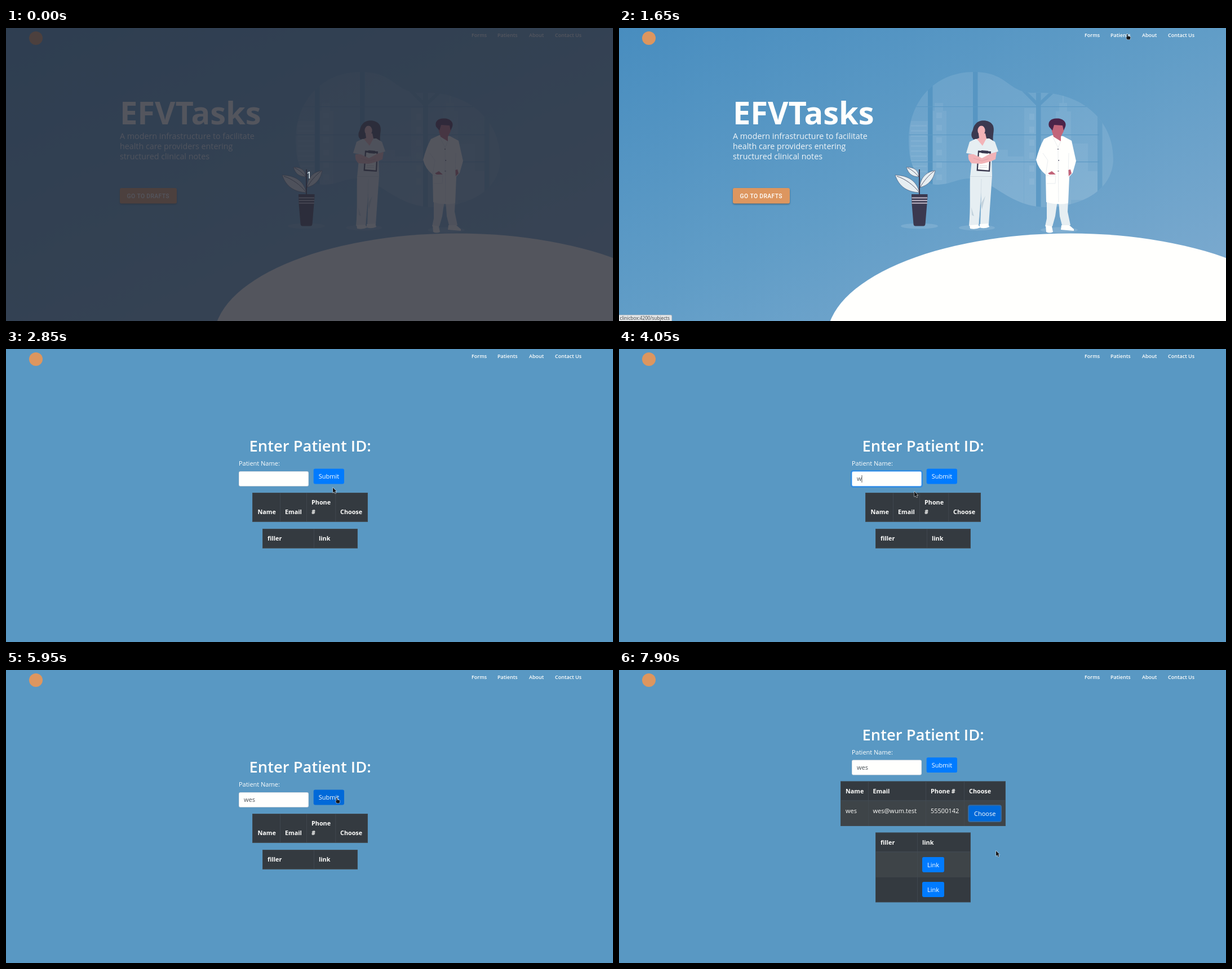
These frames come from a looping animation (1077x520 px, 8 s). An HTML page with a canvas:

```html
<!DOCTYPE html>
<html lang="en">
<head>
<meta charset="utf-8">
<title>Clinic forms demo</title>
<style>
  html, body { margin: 0; width: 100%; height: 100%; overflow: hidden; background: #5998c3; }
  canvas { display: block; width: 1077px; height: 520px; }
</style>
</head>
<body>
<canvas id="stage" width="1077" height="520"></canvas>
<script>
const W = 1077, H = 520, LOOP = 8000;
const ctx = document.getElementById('stage').getContext('2d');
const SANS = '"Open Sans", "Noto Sans", sans-serif';
const WHITE = '#fffffd', ORANGE = '#dd965f', DARK = '#343a40', ROW = '#3e4448', LINE = '#454d55';
const BLUE = [0, 123, 255], PRESSED = [0, 105, 217];
const INK = '#3b3950', CLOTH = '#e6eef2', PINK = '#f2b3b7', SKIN = '#c2657a';
const PERSON = 'wes', MAIL = 'wes@wum.test', PHONE = '55500142';

// time, x, y, cursor shape from this moment on
const POINTER = [
  [650, 638, 86, 'arrow'], [800, 690, 70, 'arrow'], [1000, 790, 48, 'arrow'],
  [1200, 868, 26, 'arrow'], [1300, 890, 17, 'hand'], [1450, 901, 11, 'hand'],
  [1950, 901, 11, 'hand'], [2050, 897, 20, 'arrow'], [2300, 862, 48, 'arrow'],
  [2400, 862, 48, 'arrow'], [2450, 790, 105, 'arrow'], [2550, 650, 190, 'arrow'],
  [2600, 560, 239, 'arrow'], [2700, 560, 239, 'arrow'], [2750, 605, 246, 'arrow'],
  [2850, 580, 246, 'arrow'], [2950, 520, 232, 'beam'], [3050, 520, 236, 'beam'],
  [3150, 524, 253, 'arrow'], [5350, 524, 253, 'arrow'], [5400, 532, 251, 'arrow'],
  [5550, 532, 251, 'arrow'], [5600, 540, 247, 'arrow'], [5800, 575, 232, 'hand'],
  [5900, 586, 227, 'hand'], [6000, 586, 227, 'arrow'], [6250, 586, 227, 'arrow'],
  [6500, 605, 270, 'arrow'], [6650, 628, 298, 'hand'], [6800, 660, 299, 'hand'],
  [7550, 660, 299, 'arrow'], [7850, 660, 299, 'arrow'], [7900, 669, 321, 'arrow']
];

const clamp = v => v < 0 ? 0 : v > 1 ? 1 : v;
const fade = (t, start) => clamp((t - start + 50) / 150);
const mix = (a, b, k) => `rgb(${a.map((v, i) => Math.round(v + (b[i] - v) * k))})`;

function box(x, y, w, h, color, radius = 0) {
  ctx.fillStyle = color;
  ctx.beginPath();
  ctx.roundRect(x, y, w, h, radius);
  ctx.fill();
}

function shape(d, color) {
  ctx.fillStyle = color;
  ctx.fill(new Path2D(d));
}

function stroke(d, color, width) {
  ctx.strokeStyle = color;
  ctx.lineWidth = width;
  ctx.stroke(new Path2D(d));
}

function oval(x, y, rx, ry, color) {
  ctx.fillStyle = color;
  ctx.beginPath();
  ctx.ellipse(x, y, rx, ry, 0, 0, Math.PI * 2);
  ctx.fill();
}

function text(str, x, y, size, color = WHITE, weight = 400, family = SANS) {
  ctx.font = `${weight} ${size}px ${family}`;
  ctx.fillStyle = color;
  ctx.fillText(str, x, y);
}

function header() {
  oval(53, 18, 12, 12, ORANGE);
  [['Forms', 826], ['Patients', 872], ['About', 928], ['Contact Us', 974]]
    .forEach(([label, x]) => text(label, x, 16.3, 9, WHITE, 600));
}

function skyline() {
  const blob = new Path2D('M514 200C514 130 560 78 630 78C690 78 690 115 735 115C815 110 877 160 877 232' +
    'C877 285 825 318 755 318C690 316 660 266 622 267C596 268 590 278 562 278C530 276 514 245 514 200Z');
  ctx.save();
  ctx.clip(blob);
  box(510, 70, 370, 252, 'rgba(255,255,255,.1)');
  const pale = 'rgba(255,255,255,.06)';
  box(516, 165, 32, 115, pale);
  box(556, 147, 25, 131, pale);
  box(560, 133, 15, 14, pale);
  box(662, 216, 28, 90, pale);
  box(690, 228, 28, 90, pale);
  box(719, 142, 21, 176, pale);
  box(775, 148, 27, 170, pale);
  box(781, 133, 14, 15, pale);
  box(787, 120, 2, 13, pale);
  box(802, 205, 30, 100, pale);
  box(832, 254, 17, 60, pale);
  for (let i = 0; i < 6; i++) {
    box(563, 150 + i * 22, 10, 10, pale);
    box(728, 152 + i * 23, 9, 11, pale);
  }
  for (let i = 0; i < 10; i++) box(518, 172 + i * 9, 28, 3, pale);
  [[548, '#5595c2'], [628, '#5796c3'], [740, '#5d9ac5'], [849, '#659fc8']]
    .forEach(([x, color]) => box(x, 70, 8.5, 252, color));
  stroke('M716 109L744 137L774 109', '#5d9ac5', 6);
  [139, 189, 237].forEach(y => box(510, y, 342, 1.3, '#5b99c4'));
  ctx.restore();
}

function plant() {
  oval(533, 351.5, 33, 5, 'rgba(255,255,255,.12)');
  const leaves = [
    ['M533 292C512 291 497 282 490 261C513 262 528 271 533 292Z', 'M533 292C522 278 508 268 493 263'],
    ['M534 283C534 267 545 255 561 253C558 269 549 279 534 283Z', 'M534 283C541 271 549 262 559 254'],
    ['M532 264C520 264 513 258 510 247C523 247 531 252 532 264Z', 'M532 264C526 257 520 252 512 248']
  ];
  leaves.forEach(([leaf, vein]) => {
    shape(leaf, CLOTH);
    stroke(leaf, INK, .5);
    stroke(vein, INK, .8);
  });
  stroke('M533 251V296', INK, 2);
  shape('M519 295H547.5V300L546.5 312L543.5 348Q543 351.5 540 351.5H526Q523 351.5 522.5 348L519.5 312Z', INK);
  [300.5, 305.2, 309.8].forEach(y => box(519.5, y, 27.5, 1.9, '#c5bccb'));
}

function nurse() {
  oval(635, 354.5, 32, 5, 'rgba(255,255,255,.12)');
  shape('M633 170C639 162 657 162 663 172C668 182 661 190 665 206C655 201 647 200 637 200' +
    'C626 199 624 192 626 185C629 180 628 175 633 170Z', INK);
  shape('M623 262H662L656 349H641L643 291L638 350L621 351C624 320 622 290 623 262Z', CLOTH);
  stroke('M643 268L642 300L638 349', '#cdd9e1', .8);
  shape('M625 318L630 334L626 332Z M650 298L642 312L644 322Z', '#c4d3dd');
  shape('M622 350L637 349L641 354Q633 358 623 356Z M640 348L655 347L657 353Q648 357 640 354Z', WHITE);
  shape('M632 197L657 196L667 202L673 219L661 223L662 264H623L627 224L616 222L622 202Z', CLOTH);
  shape('M638 188L650 187L652 196L645 209L635 197L639 195Z', PINK);
  oval(643, 182, 6.6, 8.5, PINK);
  shape('M635 182C637 175 640 172 646 171L652 181L653 171L644 167L634 173Z', INK);
  shape('M637 217.5L660 219L658 255L634.5 253.5Z', INK);
  shape('M639 221L657.5 222.5L656 252.5L637 251Z', WHITE);
  shape('M643 217L655 218L654.5 223L643 222Z', INK);
  [244, 247].forEach(y => box(640, y, 13, .7, '#c9c9d2'));
  shape('M620 224L629 224L644 231L659 223L670 220L668 233Q655 239 643 241L625 240Q618 233 620 224Z', PINK);
  stroke('M629 231L644 236L656 232', '#dc989f', .7);
  stroke('M623 263.5H662', '#c9d5dd', .8);
}

function doctor() {
  oval(781, 358.5, 33, 5, 'rgba(255,255,255,.12)');
  shape('M759 306H778L774 334L769 352H756L759 338Z M780 306H797L796 326L801 350H786L782 334Z', CLOTH);
  shape('M757 350L768 352L770 362Q764 365 758 362Z M785 350H799L807 357V360L784 358Z', WHITE);
  shape('M769 190L754 197Q746 211 740 234Q744 250 757 260L758 309Q778 315 797 311L799 264' +
    'L805 257L811 236L803 200L788 192Z', WHITE);
  shape('M767 171H789V183L784 193L784 201L771 193L768 183Z', SKIN);
  shape('M763 175C760 165 768 160 777 160.5C787 160 795 167 792 175L789 182L787 173L772 172L769 182Z', '#4b2449');
  shape('M761 258L768 254L775 260L764 260Z M797 252L801 251L803 258L798 263Z', SKIN);
  [[779, 215], [780, 235], [779.5, 254]].forEach(([x, y]) => oval(x, y, 1, 1, INK));
  const crease = '#dbe0e4';
  stroke('M770 194L779 212L780 309', crease, .6);
  stroke('M784 201L779 212', crease, .6);
  stroke('M752 222L761 235L757 260', crease, .6);
  stroke('M798 222L797 264', crease, .6);
  stroke('M757 262H775L774 276H759', crease, .6);
}

function home(t) {
  const sky = ctx.createLinearGradient(0, 0, 407, 843);
  sky.addColorStop(0, '#488dbf');
  sky.addColorStop(.5, '#619dc7');
  sky.addColorStop(1, '#80acd0');
  box(0, 0, W, H, sky);
  skyline();
  plant();
  nurse();
  doctor();
  oval(800, 550.5, 431, 186, WHITE);
  header();
  text('EFVTasks', 202, 171, 56, WHITE, 700);
  ['A modern infrastructure to facilitate', 'health care providers entering', 'structured clinical notes']
    .forEach((line, i) => text(line, 202, 197 + i * 18, 14.3, '#f0f5f8'));
  ctx.save();
  ctx.shadowColor = 'rgba(0,0,0,.35)';
  ctx.shadowBlur = 3;
  ctx.shadowOffsetY = 1.5;
  box(202, 284, 101, 27.5, ORANGE, 3);
  ctx.restore();
  ctx.letterSpacing = '0.35px';
  text('GO TO DRAFTS', 214.5, 301.6, 10.4, WHITE, 500, 'Roboto, sans-serif');
  ctx.letterSpacing = '0px';
  if (t < 450) {
    box(0, 0, W, H, 'rgba(41,43,54,.8)');
    text('1', 533, 266.5, 17, '#eefaff');
  }
}

function button(label, x, y, w, pressed = 0, ring = 0) {
  if (ring) box(x - 2, y - 2, w + 4, 30.8, `rgba(38,143,255,${.5 * ring})`, 4);
  box(x, y, w, 26.8, mix(BLUE, PRESSED, pressed), 2.8);
  text(label, x + 9, y + 17.4, 11);
}

function table(x, y, w, headHeight, rows, dividers) {
  const h = headHeight + rows * 44.3;
  box(x, y, w, h, DARK);
  if (rows) box(x, y + headHeight, w, 44.3, ROW);
  dividers.forEach(d => box(d, y, .7, h, LINE));
  box(x, y + headHeight - 1.3, w, 1.3, LINE);
  ctx.strokeStyle = LINE;
  ctx.lineWidth = .7;
  ctx.strokeRect(x + .35, y + .35, w - .7, h - .7);
}

const heading = (str, x, y) => text(str, x, y, 10.8, WHITE, 700);

function typed(t) {
  return PERSON.slice(0, [4050, 4300, 4450].filter(at => t >= at).length);
}

function searchForm(t, y) {
  text('Enter Patient ID:', 431.5, y + 182, 27.4, WHITE, 600);
  text('Patient Name:', 413, y + 207, 11);
  const focus = fade(t, 3000) * (1 - fade(t, 5850));
  if (focus) box(411, y + 215, 128, 31, `rgba(0,123,255,${.45 * focus})`, 4.5);
  box(413, y + 217, 124, 26.8, mix([206, 212, 218], [128, 189, 255], focus), 2.8);
  box(413.7, y + 217.7, 122.6, 25.4, WHITE, 2.3);
  const value = typed(t);
  text(value, 422, y + 234.4, 11, '#495057');
  if (value && t < 5250) box(422 + ctx.measureText(value).width, y + 224, .8, 13, '#333');
  const pressed = fade(t, 5800) * (1 - fade(t, 7500));
  button('Submit', 545.7, y + 212.6, 54.3, pressed, fade(t, 6000) * (1 - fade(t, 7500)));
}

function patients(t) {
  const found = t >= 6000, chosen = t >= 7550;
  const y = chosen ? -57.4 : found ? -13.5 : 0;
  box(0, 0, W, H, '#5998c3');
  header();
  searchForm(t, y);
  const top = y + 255;
  if (found) {
    table(393, top, 293, 35, 1, [442, 544, 612]);
    [['Name', 402], ['Email', 450.5], ['Phone #', 553], ['Choose', 621]]
      .forEach(([label, x]) => heading(label, x, top + 21.5));
    [[PERSON, 402], [MAIL, 450.5], [PHONE, 553]]
      .forEach(([value, x]) => text(value, x, top + 56.5, 11));
    button('Choose', 621, top + 43.7, 56, fade(t, 6700), fade(t, 7500));
  } else {
    table(437, top, 205, 52, 0, [486, 533, 584.5]);
    [['Name', 446.5, 38], ['Email', 495, 38], ['Phone', 542, 21], ['#', 542, 38], ['Choose', 593, 38]]
      .forEach(([label, x, dy]) => heading(label, x, top + dy));
  }
  const lower = top + (found ? 91 : 64);
  const divider = chosen ? 529 : 546;
  table(455, lower, 169, 35, chosen ? 2 : 0, [divider]);
  heading('filler', 464, lower + 21);
  heading('link', divider + 9, lower + 21);
  if (chosen) [0, 1].forEach(i => button('Link', 538, lower + 43.5 + i * 44, 39));
}

function statusBar() {
  box(-3, 509, 97, 14, '#b5bcc2', 2);
  box(-3, 509.7, 96.3, 14, '#e3e6e8', 2);
  text('clinicbox:4200/subjects', 1.5, 518, 8.2, '#3c4043');
}

const CURSORS = {
  arrow: 'M0 0V9L2.2 7.2L3.8 10.5L5.3 9.9L3.7 6.6H6.5Z',
  hand: 'M0 0H1.6V3.4L5.8 4.2Q6.8 4.6 6.4 6L5.6 9.4H.8L-1.2 6.2L-.6 5.3L.2 5.8Z',
  beam: 'M-1.6-5H1.6V-4.2H.4V4.2H1.6V5H-1.6V4.2H-.4V-4.2H-1.6Z'
};

function pointer(t) {
  const i = POINTER.findLastIndex(key => key[0] <= t);
  if (i < 0) return;
  const [t0, x0, y0, kind] = POINTER[i];
  const [t1, x1, y1] = POINTER[i + 1] || [LOOP, x0, y0];
  const k = (t - t0) / (t1 - t0);
  ctx.save();
  ctx.translate(x0 + (x1 - x0) * k, y0 + (y1 - y0) * k);
  ctx.lineJoin = 'round';
  stroke(CURSORS[kind], 'rgba(255,255,255,.75)', 1.1);
  shape(CURSORS[kind], '#16181b');
  ctx.restore();
}

function draw(now) {
  const t = Math.floor((now % LOOP) / 50) * 50;
  if (t < 1950) home(t);
  else patients(t);
  if (t >= 1650 && t < 2050) statusBar();
  pointer(t);
}

const start = performance.now();
function tick() {
  draw(performance.now() - start);
  requestAnimationFrame(tick);
}
tick();
</script>
</body>
</html>
```
